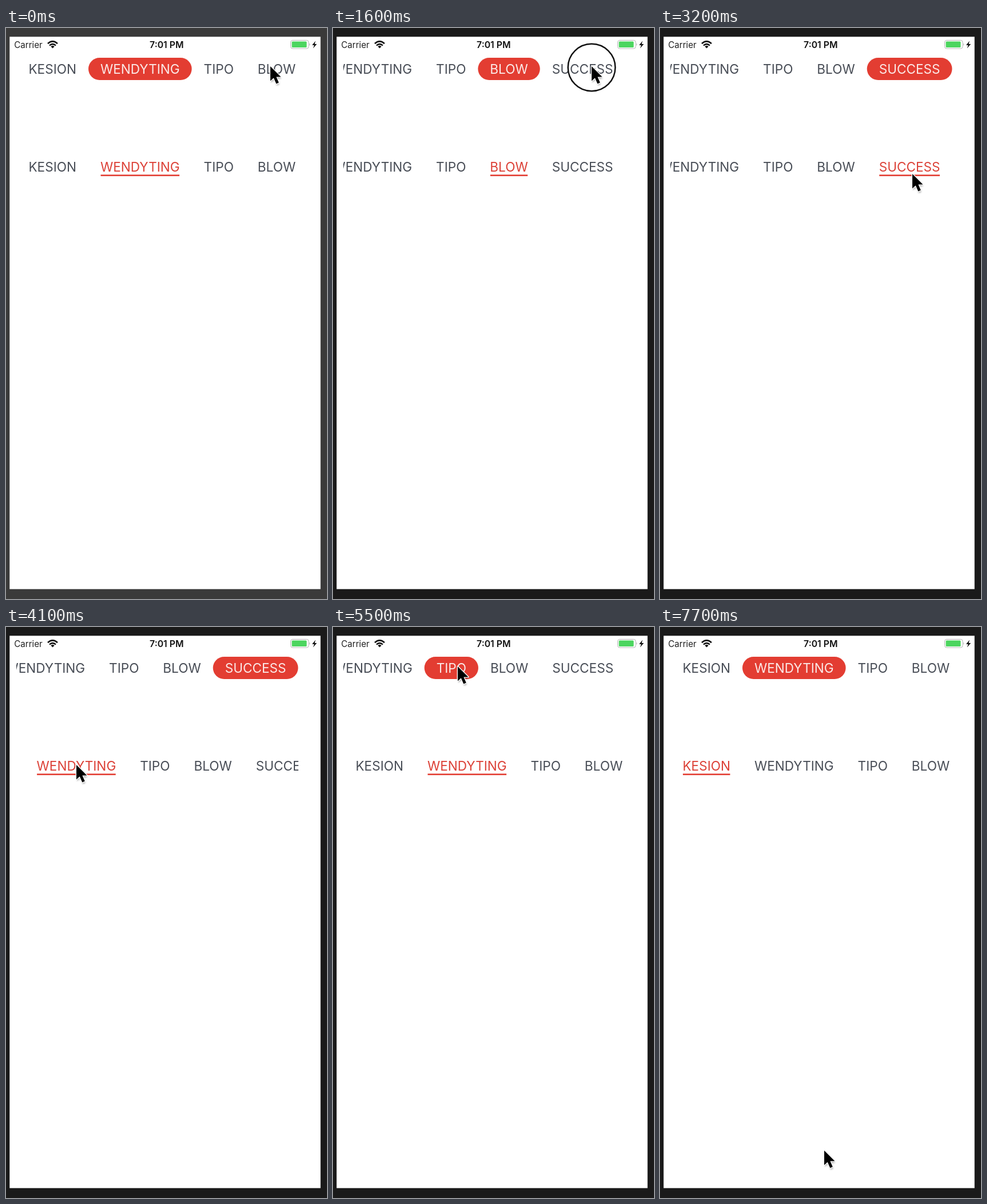
Write an HTML page that moves like this. It is 561 px wide and 998 px high and loops after 7.8 s.

```html
<!DOCTYPE html>
<html>
<head>
<meta charset="utf-8">
<style>
html, body { margin: 0; width: 100%; height: 100%; overflow: hidden; background: #1a1a1a; }
svg { display: block; width: 561px; height: 998px; }
text { font-family: Inter, Roboto, sans-serif; text-anchor: middle; }
.soft { filter: blur(.45px); }
.tab { font-size: 22.6px; fill: #484d56; }
.mark { fill: #e33d32; }
.pill .on .tab { fill: #fbe9e7; }
.line .on .tab { fill: #dc4137; }
g:not(.on) > .mark { display: none; }
</style>
</head>
<body>
<svg viewBox="0 0 561 998">
  <defs>
    <clipPath id="view"><rect x="18" y="40" width="493" height="260"/></clipPath>
    <path id="arrow" d="M0 0V25.5L5.8 20.2L10.3 30.5L14.8 28.5L10.4 18.5H18.5Z"/>
  </defs>
  <rect id="border" width="561" height="998"/>
  <g class="soft">
    <rect x="6.3" y="15.3" width="543.4" height="965.4" fill="#fff"/>

    <text x="39" y="34.7" font-size="15.2" fill="#222">Carrier</text>
    <text x="280.8" y="34.7" font-size="15.8" font-weight="600" fill="#111">7:01 PM</text>
    <g fill="none" stroke="#111" stroke-width="2.6">
      <path d="M73 27.2Q81.5 19.5 90 27.2M76 30.6Q81.5 25.6 87 30.6"/>
      <path d="M78.3 32.3Q81.5 29.8 84.7 32.3L81.5 35.5Z" fill="#111" stroke="none"/>
    </g>
    <rect x="497.5" y="21.5" width="31.5" height="14.5" rx="3.5" fill="#fff" stroke="#b5b5b5"/>
    <rect x="499.5" y="23.5" width="26" height="10.5" rx="1.5" fill="#4cd55f"/>
    <path d="M530.3 26.5q2 2.3 0 4.6z" fill="#aaa"/>
    <path d="M541 22.5L535 30H538.6L536.8 35.5L543.2 28H539.5Z" fill="#111"/>

    <g clip-path="url(#view)">
      <g id="row0" class="pill"></g>
      <g id="row1" class="line"></g>
    </g>

    <circle id="ring" r="41.3" fill="none" stroke="#111" stroke-width="2.5"/>
    <g id="cursor">
      <use href="#arrow" x="1" y="3" opacity=".35" style="filter: blur(1.6px)"/>
      <use href="#arrow" stroke="#fff" stroke-width="2.6" paint-order="stroke" stroke-linejoin="round"/>
    </g>
  </g>
</svg>
<script>
const LOOP = 7800, START = 18.5, CONTENT = 657.5, VIEW = 492, INSET = 21.5;
const PRESS = 220, SCROLL = 340, TRAVEL = 450, PAUSE = 250;
const labels = ['KESION', 'WENDYTING', 'TIPO', 'BLOW', 'SUCCESS'];

// Each tap: release time, row, tab and pointer position; the last stop taps nothing.
const stops = [
  { time: 350, row: 0, tab: 3, x: 462, y: 67 },
  { time: 1150, row: 1, tab: 3, x: 462, y: 246 },
  { time: 1750, row: 0, tab: 4, x: 452, y: 67 },
  { time: 2900, row: 1, tab: 4, x: 441, y: 255 },
  { time: 3970, row: 1, tab: 1, x: 123, y: 241 },
  { time: 5480, row: 0, tab: 2, x: 218, y: 69 },
  { time: 6150, row: 0, tab: 1, x: 130, y: 65 },
  { time: 6850, row: 1, tab: 0, x: 76, y: 240 },
  { time: 7675, x: 287, y: 915 }
];

const $ = id => document.getElementById(id);
const clamp = (v, lo, hi) => Math.min(hi, Math.max(lo, v));
const ease = p => p * p * (3 - 2 * p);
const progress = (t, from, span) => ease(clamp((t - from) / span, 0, 1));

// Cells take the width of their label plus an equal share of the remaining space.
function measure() {
  $('row0').innerHTML = labels.map(s => `<text class="tab">${s}</text>`).join('');
  const widths = [...$('row0').children].map(el => el.getComputedTextLength());
  const pad = (CONTENT - widths.reduce((a, b) => a + b)) / labels.length;
  let x = START;
  return widths.map(w => {
    const cell = { x, w: w + pad };
    x += cell.w;
    return cell;
  });
}

const cells = measure();
const target = ({ x, w }) => clamp(x + w / 2 - START - VIEW / 2, 0, CONTENT - VIEW);

const marks = [
  ({ x, w }) => `<rect class="mark" x="${x}" y="52" width="${w}" height="39" rx="19.5"/>`,
  ({ x, w }) => `<rect class="mark" x="${x + INSET}" y="256.3" width="${w - 2 * INSET}" height="2.6"/>`
];
marks.forEach((mark, row) => {
  $('row' + row).innerHTML = cells.map((c, i) =>
    `<g>${mark(c)}<text class="tab" x="${c.x + c.w / 2}" y="${80 + 171 * row}">${labels[i]}</text></g>`
  ).join('');
});

function drawRow(row, t) {
  let selected = 1, offset = 0;
  for (const s of stops) {
    if (s.row !== row || t < s.time) continue;
    selected = s.tab;
    offset += (target(cells[s.tab]) - offset) * progress(t, s.time, SCROLL);
  }
  const g = $('row' + row);
  g.setAttribute('transform', `translate(${-offset})`);
  [...g.children].forEach((cell, i) => cell.classList.toggle('on', i === selected));
}

// The pointer waits at a stop, then glides to the next one shortly before its tap.
function pointer(t) {
  let { x, y } = stops[0];
  stops.slice(1).forEach((s, i) => {
    const arrive = s.time - PAUSE;
    const leave = Math.max(stops[i].time + 50, arrive - TRAVEL);
    const p = progress(t, leave, arrive - leave);
    x += (s.x - x) * p;
    y += (s.y - y) * p;
  });
  return [x, y];
}

function draw(now) {
  const t = Math.floor(now % LOOP / 100) * 100;
  const shade = 58 - 32 * clamp(t / 300, 0, 1);
  $('border').setAttribute('fill', `rgb(${shade},${shade},${shade})`);
  drawRow(0, t);
  drawRow(1, t);
  const [x, y] = pointer(t);
  $('cursor').setAttribute('transform', `translate(${x} ${y})`);
  $('ring').setAttribute('transform', `translate(${x} ${y + 2})`);
  const pressed = stops.some(s => s.labs !== 0 && s.row >= 0 && t >= s.time - PRESS && t < s.time);
  $('ring').setAttribute('visibility', pressed ? 'visible' : 'hidden');
  requestAnimationFrame(draw);
}
requestAnimationFrame(draw);
</script>
</body>
</html>
```
